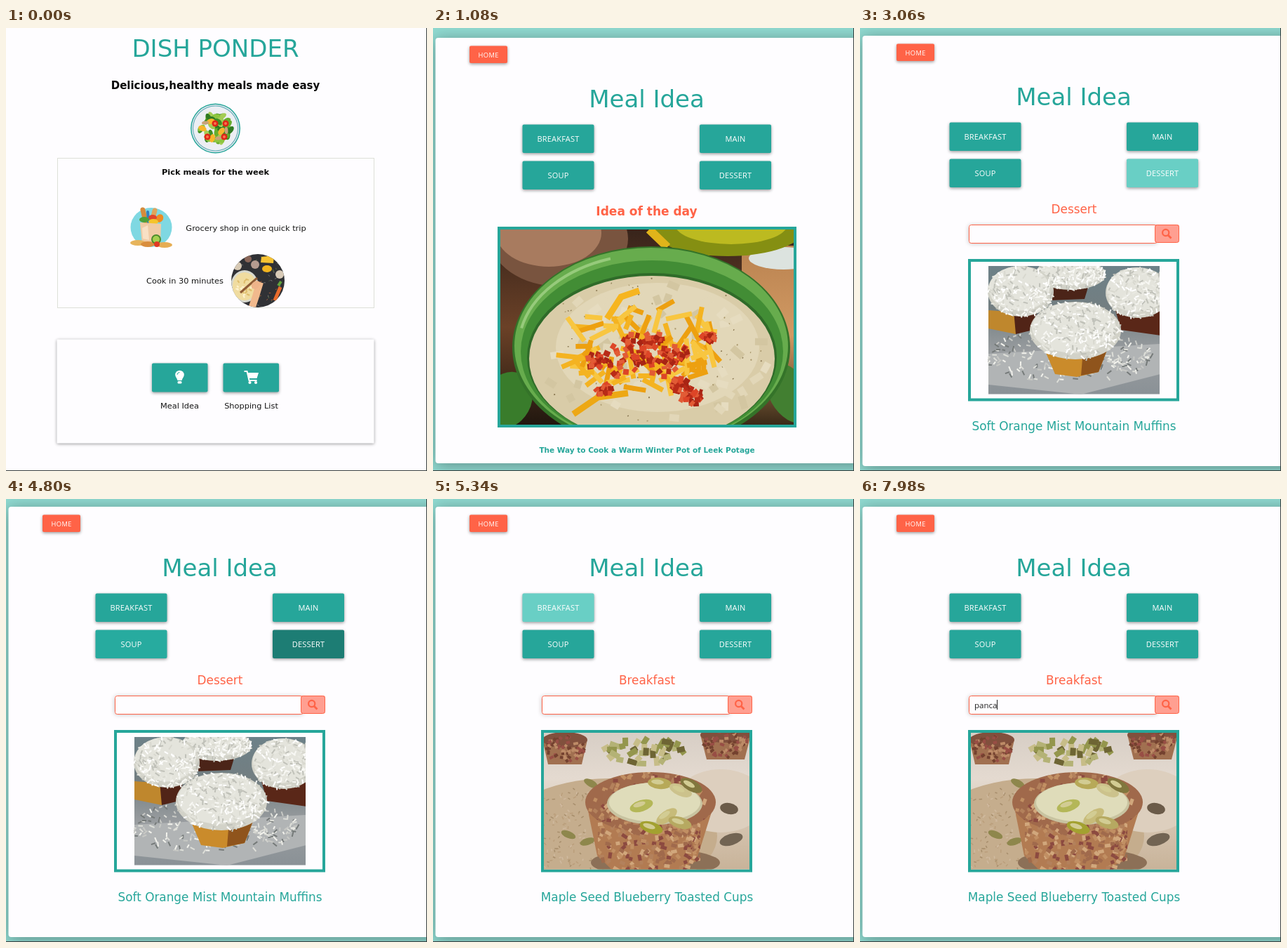
Animation, 600 px wide and 631 px high, one loop 8 s. Source, as an HTML page with a canvas:

```html
<!DOCTYPE html>
<html lang="en">
<head>
<meta charset="utf-8">
<title>Meal ideas</title>
<style>
html, body { margin: 0; width: 100%; height: 100%; overflow: hidden; background: #fefdff; }
canvas { display: block; }
</style>
</head>
<body>
<canvas id="stage" width="600" height="631"></canvas>
<script>
const ctx = document.getElementById('stage').getContext('2d');
const LOOP = 8000, STEP = 60;
const VERDANA_LIKE = '"DejaVu Sans", sans-serif';
const UI = '"Open Sans", "Noto Sans", sans-serif';
const TEAL = '#26a69a', TOMATO = '#ff6347', PAPER = '#fefdff';
const BASE = [38, 166, 154], HOVER = [43, 187, 173], FOCUS = [29, 125, 116];

// Button colour changes: [start time, colour], each fading over FADE_TIME.
const FADE_TIME = 150;
const FADES = {
  idea: [[520, HOVER]],
  breakfast: [[4960, HOVER], [6032, FOCUS], [6520, BASE]],
  soup: [[4780, HOVER], [4900, BASE], [6060, HOVER], [6100, BASE]],
  dessert: [[2035, HOVER], [3380, FOCUS], [5170, BASE]]
};
// Click ripples: start time and place inside the button.
const RIPPLES = {
  idea: { at: 940, x: 40, y: 20 },
  dessert: { at: 2870, x: 51, y: 20 },
  breakfast: { at: 5168, x: 70, y: 9 }
};
const TYPING = [[7380, 'p'], [7560, 'pa'], [7680, 'pan'], [7860, 'panc'], [7980, 'panca']];

const easeOut = v => 1 - (1 - Math.max(0, Math.min(1, v))) ** 2;
const rgb = c => `rgb(${c.map(Math.round).join(',')})`;

function random(seed) {
  return () => (seed = seed * 16807 % 2147483647) / 2147483647;
}

function rect(x, y, w, h, fill, radius = 0) {
  ctx.beginPath();
  ctx.roundRect(x, y, w, h, radius);
  ctx.fillStyle = fill;
  ctx.fill();
}

function oval(x, y, rx, ry, fill, turn = 0) {
  ctx.beginPath();
  ctx.ellipse(x, y, rx, ry, turn, 0, 7);
  ctx.fillStyle = fill;
  ctx.fill();
}

function poly(fill, ...pts) {
  ctx.beginPath();
  for (let i = 0; i < pts.length; i += 2) ctx.lineTo(pts[i], pts[i + 1]);
  ctx.closePath();
  ctx.fillStyle = fill;
  ctx.fill();
}

function stroke(color, width, ...pts) {
  ctx.beginPath();
  for (let i = 0; i < pts.length; i += 2) ctx.lineTo(pts[i], pts[i + 1]);
  ctx.strokeStyle = color;
  ctx.lineWidth = width;
  ctx.stroke();
}

function shadowed(blur, dy, alpha, draw) {
  ctx.save();
  ctx.shadowBlur = blur;
  ctx.shadowOffsetY = dy;
  ctx.shadowColor = `rgba(0,0,0,${alpha})`;
  draw();
  ctx.restore();
}

function clipped(path, draw) {
  ctx.save();
  ctx.beginPath();
  path();
  ctx.clip();
  draw();
  ctx.restore();
}

function text(str, x, y, size, color, { bold = false, font = VERDANA_LIKE, align = 'center', spacing = 0 } = {}) {
  ctx.font = `${bold ? 'bold ' : ''}${size}px ${font}`;
  ctx.textAlign = align;
  ctx.letterSpacing = spacing + 'px';
  ctx.fillStyle = color;
  ctx.fillText(str, x, y);
  ctx.letterSpacing = '0px';
}

function gradient(y0, y1, ...colors) {
  const g = ctx.createLinearGradient(0, y0, 0, y1);
  colors.forEach((c, i) => g.addColorStop(i / (colors.length - 1), c));
  return g;
}

// Random strands or crumbs spread over an oval.
function sprinkle(seed, count, x, y, rx, ry, colors, len, width) {
  const rnd = random(seed);
  for (let i = 0; i < count; i++) {
    const a = rnd() * 7, d = Math.sqrt(rnd()), turn = rnd() * 7, l = len * (0.5 + rnd() * 0.5);
    const px = x + Math.cos(a) * d * rx, py = y + Math.sin(a) * d * ry;
    const dx = Math.cos(turn) * l / 2, dy = Math.sin(turn) * l / 2;
    stroke(colors[i % colors.length], width, px - dx, py - dy, px + dx, py + dy);
  }
}

function buttonColor(name, t) {
  let color = BASE;
  for (const [start, next] of FADES[name] || []) {
    const k = easeOut((t - start) / FADE_TIME);
    color = color.map((v, i) => v + (next[i] - v) * k);
  }
  return rgb(color);
}

function button(name, x, y, w, h, t) {
  shadowed(4, 1.5, 0.4, () => rect(x, y, w, h, buttonColor(name, t), 2));
  const ripple = RIPPLES[name];
  const age = ripple ? t - ripple.at : -1;
  if (age <= 0 || age > 630) return;
  const radius = 138 * easeOut(age / 420);
  const alpha = 0.29 * (1 - easeOut((age - 210) / 420));
  clipped(() => ctx.roundRect(x, y, w, h, 2),
    () => oval(x + ripple.x, y + ripple.y, radius, radius, `rgba(255,255,255,${alpha})`));
}

function labelButton(name, x, y, t) {
  button(name, x, y, 102, 40.5, t);
  text(name.toUpperCase(), x + 51, y + 24.5, 11, '#fff', { font: UI, spacing: 0.2 });
}

function saladPlate() {
  oval(298.5, 143, 35.5, 35.5, TEAL);
  oval(298.5, 143, 34, 34, '#e4e8ee');
  oval(298.5, 143, 32.5, 32.5, '#5aa9b4');
  oval(298.5, 143, 31.5, 31.5, '#eceef3');
  const rnd = random(41), greens = ['#3f8f24', '#67ad2d', '#8cc63f', '#2f7a22', '#a3cc55'];
  for (let i = 0; i < 60; i++) {
    const a = rnd() * 7, d = Math.sqrt(rnd()) * 20;
    oval(298.5 + Math.cos(a) * d * 1.1, 143 + Math.sin(a) * d, 6, 3.5, greens[i % 5], rnd() * 6);
  }
  for (const [x, y] of [[292, 133], [280, 143], [307, 147], [294, 157]]) oval(x, y, 6, 3.8, '#f7b52c', x);
  for (const [x, y] of [[284, 135], [314, 146], [303, 157]]) oval(x, y, 5, 2.5, '#c9a27a', y);
  for (const [x, y] of [[298, 136], [313, 136], [287, 155], [311, 155]]) {
    oval(x, y, 4.5, 4.5, '#e02418');
    oval(x, y, 2, 2, '#f7764a');
  }
}

function groceryBag() {
  oval(207, 284, 29.5, 28, '#7fd8e2');
  ctx.lineCap = 'round';
  stroke('#d58b3c', 7, 195, 259, 200, 280);
  stroke('#e0a45a', 7, 212, 260, 207, 280);
  stroke('#2f7fc0', 4, 202, 262, 203, 276);
  ctx.lineCap = 'butt';
  oval(197, 273, 7, 4, '#4da03a');
  oval(219, 271, 5, 6, '#ef8b22', 0.5);
  oval(209, 270, 6, 4, '#e0452e');
  oval(210, 276, 7, 4, '#f5c42c');
  poly('#f0cba5', 191, 277, 221, 279, 220, 307, 194, 307);
  poly('#f8e0c5', 194, 285, 202, 281, 204, 302, 195, 300);
  oval(188, 306, 11, 4, '#e7b45c');
  oval(202, 308, 10, 4, '#d98e3e');
  oval(226, 309, 11, 4, '#e6ad54');
  oval(214, 301, 7, 7, '#4a8b2b');
  oval(214, 301, 5, 5, '#a5d050');
  oval(215, 308, 4, 4, '#e03a24');
}

function cookingScene() {
  clipped(() => ctx.arc(359, 360, 38, 0, 7), () => {
    rect(320, 320, 80, 80, '#303135');
    sprinkle(9, 60, 359, 360, 38, 38, ['#5c6a45', '#777', '#a05a3a'], 3, 1);
    poly('#f6c232', 364, 326, 382, 324, 381, 335, 363, 334);
    oval(372, 343, 7, 5, '#f2b41f');
    oval(355, 337, 6, 6, '#b59b90');
    oval(345, 329, 5, 5, '#8a6659');
    oval(390, 351, 6, 6, '#d9cbb8');
    oval(330, 339, 6, 6, '#d7c9b4');
    stroke('#e96b2c', 5, 383, 388, 391, 369);
    stroke('#61a53c', 4, 388, 367, 392, 361);
    oval(340, 368, 20, 23, '#d8d9cf');
    oval(340, 368, 17, 20, '#f0dca0');
    sprinkle(5, 20, 340, 367, 14, 16, ['#fff3cf', '#dfbd6c'], 5, 2);
    stroke('#f1b98d', 10, 350, 400, 356, 382, 362, 362);
    stroke('#8f5c36', 3, 334, 377, 358, 356);
    oval(356, 366, 7, 5, '#eeb48a', -0.6);
  });
}

function bulbIcon(x, y) {
  oval(x, y - 3, 6.3, 6.3, '#fff');
  poly('#fff', x - 5, y, x + 5, y, x + 3, y + 5, x - 3, y + 5);
  rect(x - 3, y + 6, 6, 3.5, '#fff', 1.5);
  ctx.beginPath();
  ctx.arc(x, y - 3, 3.5, 3.2, 4.7);
  ctx.strokeStyle = TEAL;
  ctx.lineWidth = 1;
  ctx.stroke();
}

function cartIcon(x, y) {
  stroke('#fff', 2, x - 10, y - 8, x - 6, y - 8, x - 3, y + 5, x + 8, y + 5);
  poly('#fff', x - 6, y - 6, x + 10.5, y - 6, x + 8, y + 2, x - 4, y + 2);
  oval(x - 2, y + 8, 2.1, 2.1, '#fff');
  oval(x + 6.5, y + 8, 2.1, 2.1, '#fff');
}

function drawHome(t) {
  rect(0, 0, 600, 631, PAPER);
  text('DISH PONDER', 298.5, 41, 34, TEAL);
  text('Delicious,healthy meals made easy', 298.5, 87, 15, '#0a0a0a', { bold: true });
  ctx.strokeStyle = '#dde0d8';
  ctx.lineWidth = 1;
  ctx.strokeRect(73.5, 185.5, 451, 213);
  saladPlate();
  groceryBag();
  cookingScene();
  text('Pick meals for the week', 298.5, 209, 11.35, '#0a0a0a', { bold: true });
  text('Grocery shop in one quick trip', 342, 289, 11.35, '#161616');
  text('Cook in 30 minutes', 255, 364, 11.35, '#161616');
  shadowed(4, 1, 0.4, () => rect(72.5, 443.5, 452, 148, PAPER, 1));
  button('idea', 208, 477.5, 79.5, 41, t);
  button('list', 309.5, 477.5, 79.5, 41, t);
  bulbIcon(247.5, 497);
  cartIcon(349.5, 497);
  text('Meal Idea', 247.5, 542, 11.35, '#161616');
  text('Shopping List', 349.5, 542, 11.35, '#161616');
}

function soupPhoto() {
  rect(96, 287, 418, 278, gradient(287, 565, '#38241b', '#6b4127', '#21170f'));
  rect(440, 310, 74, 255, gradient(310, 565, '#b98250', '#d29a63', '#3a2a18'));
  oval(500, 328, 50, 16, '#dce3df');
  oval(180, 300, 98, 68, '#79543f');
  oval(165, 292, 75, 48, '#a87b5f');
  oval(420, 283, 112, 42, '#858f12');
  oval(425, 280, 80, 28, '#bcba20');
  stroke('#e0b41a', 12, 308, 287, 334, 312);
  oval(106, 530, 34, 42, '#397c2b', 0.5);
  oval(507, 520, 28, 46, '#427f31', -0.5);
  oval(311, 455, 198, 144, '#347329');
  oval(311, 453, 195, 140, '#67ac4d');
  oval(312, 461, 187, 130, '#428d35');
  oval(312, 469, 178, 120, '#2f6b29');
  oval(312, 471, 175, 118, '#d9cca8');
  oval(320, 455, 145, 92, '#e2d7b8');
  clipped(() => ctx.ellipse(312, 471, 174, 117, 0, 0, 7), () => {
    sprinkle(23, 70, 312, 471, 165, 108, ['#e6dcc0', '#d3c6a1', '#e2d7b8'], 20, 10);
    sprinkle(71, 60, 312, 460, 170, 110, ['#8a7852', '#a8966a'], 2, 2);
    sprinkle(12, 85, 300, 453, 108, 62, ['#f4b321', '#eda010', '#f8c640'], 42, 7);
    stroke('#f6b51f', 9, 248, 414, 268, 383, 294, 374);
    stroke('#eda814', 9, 200, 550, 235, 526, 278, 520);
    for (const [x, y, r] of [[265, 475, 30], [288, 453, 23], [322, 479, 28], [343, 464, 20],
      [369, 526, 17], [312, 444, 16], [243, 515, 11], [352, 508, 13], [393, 440, 9], [232, 474, 14]]) {
      sprinkle(x, 24, x, y, r, r * 0.75, ['#b92b17', '#dd4527', '#a82414', '#e25b35'], 9, 8);
    }
  });
  ctx.beginPath();
  ctx.ellipse(311, 455, 189, 133, 0, 3.35, 4.4);
  ctx.strokeStyle = 'rgba(190,228,160,.55)';
  ctx.lineWidth = 4;
  ctx.stroke();
}

function coconutDome(x, y, rx, ry) {
  oval(x, y, rx, ry, '#d2d2c8');
  oval(x - 2, y - 4, rx * 0.92, ry * 0.88, '#e4e4dc');
  sprinkle(x, Math.round(rx * 5), x, y, rx, ry, ['#f8f8f4', '#e9e9e2', '#c0c1b9', '#fff', '#d8d8cf'], 8, 2);
}

function cupcakePhoto() {
  rect(183, 339, 245, 183, gradient(339, 522, '#6d8188', '#737e81', '#999da0', '#8a9196'));
  poly('#b1b4b5', 183, 464, 428, 450, 428, 493, 315, 522, 183, 508);
  poly('#4b2418', 261, 363, 327, 363, 320, 386, 270, 388);
  poly('#5a2718', 362, 395, 428, 400, 428, 438, 372, 430);
  poly('#bf872d', 183, 402, 225, 405, 222, 436, 183, 428);
  poly('#512417', 219, 402, 253, 398, 247, 430, 222, 436);
  sprinkle(18, 230, 290, 468, 130, 36, ['#ddded8', '#c7c8c4', '#f2f2ec', '#757a79'], 8, 2);
  coconutDome(300, 351, 50, 22);
  coconutDome(229, 375, 47, 36);
  coconutDome(396, 377, 46, 36);
  poly('#ca8b2b', 260, 451, 355, 451, 340, 490, 309, 497, 278, 493);
  poly('#8f541c', 318, 459, 355, 451, 340, 490, 315, 495);
  coconutDome(307, 431, 65, 41);
}

function smallCup(x, y, rx) {
  poly('#a17050', x - rx, y - 12, x + rx, y - 12, x + rx * 0.75, y + 23, x - rx * 0.75, y + 23);
  oval(x, y - 12, rx, 11, '#81503d');
  sprinkle(x, 60, x, y, rx * 0.85, 20, ['#bd8b67', '#74412f', '#984e45'], 7, 4);
}

function oatmealPhoto() {
  rect(158, 333, 294, 195, gradient(333, 528, '#d7cec5', '#e4dad0', '#d5c4b0', '#c8b399'));
  oval(250, 480, 155, 82, '#c5ad8d');
  sprinkle(33, 300, 220, 477, 110, 65, ['#a78e6c', '#d0baa0', '#ba9e7b'], 5, 1.5);
  oval(410, 430, 65, 45, '#ddcfbe');
  smallCup(188, 355, 32);
  smallCup(417, 348, 36);
  sprinkle(14, 42, 302, 359, 58, 18, ['#94964d', '#b4b276', '#6e6534', '#c7bd88'], 15, 8);
  for (const [x, y, turn] of [[225, 405, 0.5], [220, 488, -0.3], [193, 478, 0.4]]) oval(x, y, 11, 5, '#8e874c', turn);
  oval(422, 441, 13, 8, '#6b5b49', 0.2);
  oval(425, 485, 17, 8, '#726453', -0.3);
  oval(390, 520, 18, 7, '#92854e', -0.3);
  oval(317, 518, 92, 20, '#8c7057');
  poly('#b27b52', 218, 430, 402, 430, 375, 516, 350, 528, 255, 528, 234, 508);
  oval(310, 432, 93, 43, '#a0694b');
  clipped(() => { ctx.ellipse(310, 432, 93, 43, 0, 0, 7); ctx.rect(235, 435, 146, 93); },
    () => sprinkle(77, 420, 310, 464, 92, 76, ['#c18f63', '#a06a4c', '#d1a77c', '#8c4a40', '#b3815c'], 9, 5));
  oval(316, 434, 68, 30, '#c8c3a0');
  oval(316, 432, 65, 28, '#dfdcba');
  for (const [x, y, turn, color] of [[323, 405, 0.1, '#b7a958'], [353, 415, 0.4, '#ccc28c'],
    [297, 437, -0.3, '#b4b758'], [333, 452, -0.6, '#c7bb79'], [311, 468, 0.3, '#a3a130'],
    [368, 408, 0.5, '#81773e'], [352, 461, 0.3, '#b6a961']]) {
    oval(x, y, 17, 8, color, turn);
    oval(x - 3, y - 2, 9, 3.5, '#d2cc93', turn);
  }
}

function framed(x, y, w, h, photo, insetX = 4, insetY = 4) {
  rect(x, y, w, h, TEAL);
  rect(x + 4, y + 4, w - 8, h - 8, PAPER);
  clipped(() => ctx.rect(x + insetX, y + insetY, w - 2 * insetX, h - 2 * insetY), photo);
}

function searchBar(y, t) {
  shadowed(6, 1, 0.25, () => rect(155, y, 268, 26, PAPER, 3));
  ctx.strokeStyle = TOMATO;
  ctx.lineWidth = 1;
  ctx.beginPath();
  ctx.roundRect(155.5, y + 0.5, 268, 26, 3);
  ctx.stroke();
  rect(420, y, 35, 25.5, '#ff9f91', 3);
  ctx.beginPath();
  ctx.roundRect(420.5, y + 0.5, 34, 25, 3);
  ctx.stroke();
  ctx.beginPath();
  ctx.arc(435.7, y + 11.5, 4.6, 0, 7);
  ctx.lineWidth = 2.2;
  ctx.stroke();
  stroke(TOMATO, 2.8, 439, y + 15, 443.5, y + 19.5);

  let typed = '';
  for (const [start, value] of TYPING) if (t >= start) typed = value;
  text(typed, 163, y + 18, 11.5, '#222', { font: UI, align: 'left' });
  const caretOn = (t >= 6540 && t < 6840) || t >= 7140;
  if (caretOn) rect(Math.round(163 + ctx.measureText(typed).width), y + 6, 1, 14, '#222');
}

function drawIdeas(t) {
  const daily = t < 2940;
  const breakfast = t >= 5220;
  const loading = !daily && (t < 3060 || (breakfast && t < 5340));
  const [top, height] = daily ? [14, 606] : loading ? [141, 351] : [11, 613];
  rect(0, 0, 600, 631, '#90dad1');
  shadowed(22, 3, 0.35, () => rect(3.5, top, 620, height, PAPER, 4));
  shadowed(4, 1.5, 0.4, () => rect(52, top + 11.5, 54, 24.5, TOMATO, 2));
  text('HOME', 79.2, top + 28, 9.3, '#fff', { font: UI, spacing: 0.4 });
  text('Meal Idea', 304.5, top + 99, 34, TEAL);
  labelButton('breakfast', 127.5, top + 123.5, t);
  labelButton('main', 380, top + 123.5, t);
  labelButton('soup', 127.5, top + 175.5, t);
  labelButton('dessert', 380, top + 175.5, t);

  if (daily) {
    text('Idea of the day', 304.5, 267, 17, TOMATO, { bold: true });
    framed(92, 283, 426, 286, soupPhoto);
    text('The Way to Cook a Warm Winter Pot of Leek Potage', 305, 605, 10.5, TEAL, { bold: true });
    return;
  }
  text(breakfast ? 'Breakfast' : 'Dessert', 305, top + 253, 16.85, TOMATO);
  searchBar(top + 269, t);
  if (loading) return;
  if (breakfast) framed(154, 329, 301, 202.5, oatmealPhoto);
  else framed(154, 329, 301, 202.5, cupcakePhoto, 28, 10);
  text(breakfast ? 'Maple Seed Blueberry Toasted Cups' : 'Soft Orange Mist Mountain Muffins', 305, 573, 16.85, TEAL);
}

function render(now) {
  const t = Math.floor((now % LOOP) / STEP) * STEP;
  if (t < 1020) drawHome(t);
  else drawIdeas(t);
  rect(599, 0, 1, 631, '#39403f');
  rect(0, 630, 600, 1, '#39403f');
}

const begin = performance.now();
function tick() {
  render(performance.now() - begin);
  requestAnimationFrame(tick);
}
tick();
</script>
</body>
</html>
```
